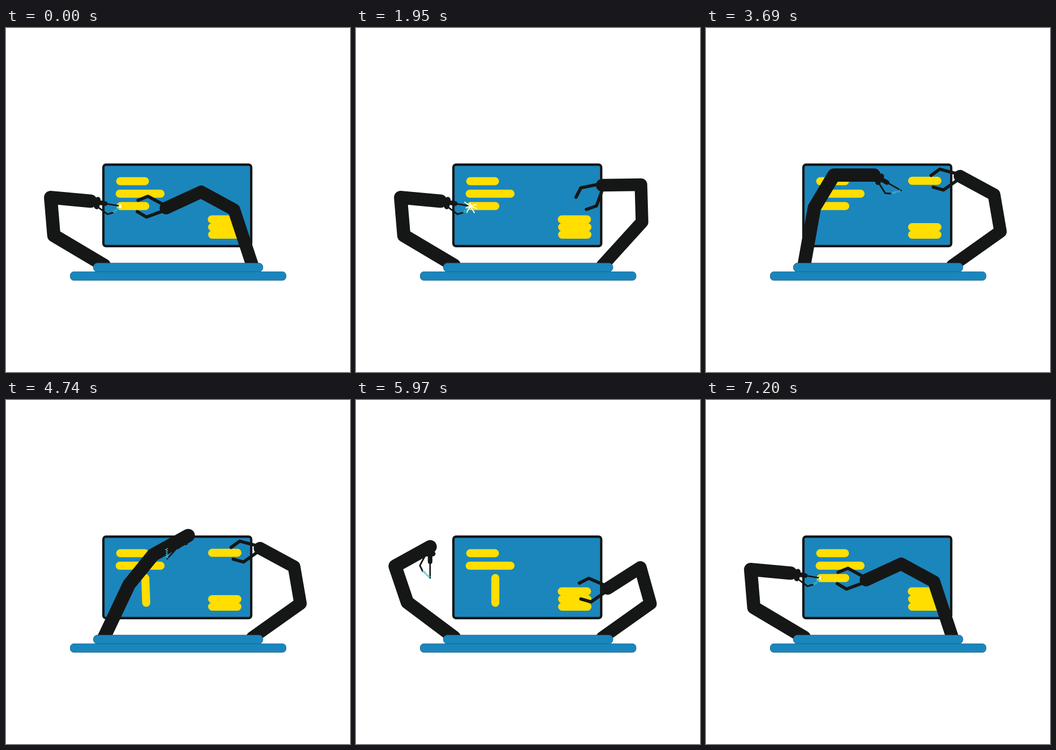
An HTML page with a canvas that plays this animation: 640 by 640 pixels, repeating every 7230 ms.

```html
<!DOCTYPE html>
<html lang="en">
<head>
<meta charset="utf-8">
<title>Robot arms at work</title>
<style>
html, body { margin: 0; width: 100%; height: 100%; overflow: hidden; background: #fff; }
canvas { display: block; width: 640px; height: 640px; }
</style>
</head>
<body>
<canvas id="stage" width="640" height="640"></canvas>
<script>
const LOOP = 7230;
const BLUE = '#1b86bc', DARK = '#151716', YELLOW = '#ffde00', EDGE = '#12618c', CYAN = '#3fb9ba';
const ctx = document.getElementById('stage').getContext('2d');
ctx.lineCap = ctx.lineJoin = 'round';

// A pose lists joint angles in degrees, each relative to the part before it.
// Left: three parts and the welder.
const weld = [-149.3, 54.5, 100.1, 4];
const press = [-118.3, 38.8, 72.5, 101.8];
const reach = [-64.7, 13.9, 55, -15];
const fold = [-64.7, 13.9, 21.8, 161];
const retract = [-86, 22, 33, 145];
const rest = [-143.2, 34.5, 79.7, 119];

// Right: three parts, the claw and its opening.
const hold = [-108.3, -43.2, -53.2, 28.9, 29];
const release = [-101.3, -43.2, -53.2, 9.2, 33.7];
const swing = [-47.8, -43.9, -89.1, -39.9, 33.7];
const stack = [-35.4, -70.2, -107, 27.1, 33.5];
const place = [-35.4, -64.4, -51.8, -38.6, 29.5];

const left = {
  base: [182.5, 441.5], lengths: [108.7, 71, 74.5], width: 24.8,
  steps: [[2300, weld], [3030, press], [4170, reach], [4440, reach], [4740, fold],
          [5200, retract], [5930, rest], [6000, rest], [7100, weld]]
};
const right = {
  base: [458.5, 442], lengths: [109.5, 69.5, 72], width: 23.5,
  steps: [[1050, hold], [1290, release], [1950, swing], [2270, stack], [2340, stack],
          [3000, place], [5250, place], [5900, stack], [6000, stack], [6800, hold]]
};

const rad = deg => deg * Math.PI / 180;

function ease(t, from, to) {
  const x = Math.min(1, Math.max(0, (t - from) / (to - from)));
  return x * x * (3 - 2 * x);
}

// Monotone cubic through the steps: a joint rests where it turns back, else flows on.
function joint(steps, j, t) {
  const n = steps.length - 1;
  if (t <= steps[0][0]) return steps[0][1][j];
  if (t >= steps[n][0]) return steps[n][1][j];
  let i = 0;
  while (t >= steps[i + 1][0]) i++;
  const slope = k => (steps[k + 1][1][j] - steps[k][1][j]) / (steps[k + 1][0] - steps[k][0]);
  const tangent = k => {
    if (k === 0 || k === n) return 0;
    const a = slope(k - 1), b = slope(k);
    return a * b <= 0 ? 0 : 2 * a * b / (a + b);
  };
  const [t0, p0] = steps[i], [t1, p1] = steps[i + 1];
  const d = t1 - t0, x = (t - t0) / d, y = 1 - x;
  return p0[j] * (1 + 2 * x) * y * y + tangent(i) * d * x * y * y
       + p1[j] * x * x * (3 - 2 * x) - tangent(i + 1) * d * x * x * y;
}

function random(seed) {
  const s = Math.sin(seed * 127.1 + 11.7) * 43758.5453;
  return s - Math.floor(s);
}

function line(points, width, color) {
  ctx.beginPath();
  points.forEach(([x, y]) => ctx.lineTo(x, y));
  ctx.lineWidth = width;
  ctx.strokeStyle = color;
  ctx.stroke();
}

function box(x, y, w, h, r, stroke, width) {
  ctx.beginPath();
  ctx.roundRect(x, y, w, h, r);
  ctx.fillStyle = BLUE;
  ctx.fill();
  ctx.lineWidth = width;
  ctx.strokeStyle = stroke;
  ctx.stroke();
}

function inFrame([x, y], angle, draw) {
  ctx.save();
  ctx.translate(x, y);
  ctx.rotate(rad(angle));
  draw();
  ctx.restore();
}

function drawBar(cx, cy, length) {
  const half = (length - 15) / 2;
  line([[cx - half, cy], [cx + half, cy]], 15, YELLOW);
}

// Draws the three arm parts, then the tool in the frame of the wrist.
function drawArm({ base, lengths, width, steps }, t, tool) {
  let [x, y] = base, angle = 0;
  const points = [base];
  lengths.forEach((len, j) => {
    angle += joint(steps, j, t);
    x += len * Math.cos(rad(angle));
    y += len * Math.sin(rad(angle));
    points.push([x, y]);
  });
  line(points, width, DARK);
  inFrame([x, y], angle + joint(steps, 3, t), () => tool(t));
}

function drawClaw(t) {
  const opening = joint(right.steps, 4, t);
  for (const side of [1, -1]) {
    inFrame([0, 0], side * opening, () =>
      line([[8, side * 2.5], [40, 0], [51.3, -side * 16.3]], 6, DARK));
  }
}

function drawWelder(t) {
  line([[13, -5], [13, 8]], 10, DARK);
  line([[18, 0], [28, 0]], 8.5, DARK);
  line([[28, 0], [58, 0]], 2.8, DARK);
  line([[18, 10], [35, 19], [45, 14]], 3, DARK);
  const step = Math.floor(t / 60), zigzag = [];
  for (let i = 0; i <= 8; i++) {
    const k = i / 8, side = (i % 2 ? 1 : -1) * (0.7 + random(step + i * 9));
    zigzag.push([45 + 12 * k + side, 14 - 13 * k + side]);
  }
  line(zigzag, 1.4, CYAN);
}

// Short bursts of rays fly out of the weld.
function drawSparks(t) {
  const age = (t - 7170 + LOOP) % LOOP;
  if (age > 2350) return;
  const period = 300, burst = Math.floor(age / period), p = age % period / period;
  line([[212, 332], [213, 331]], 5, '#fff');
  for (let i = 0; i < 7; i++) {
    const a = (i + 0.8 * random(burst * 7 + i)) * 2 * Math.PI / 7;
    const far = (9 + 14 * random(burst * 13 + i + 40)) * p, near = far * 0.3 * p;
    line([near, far].map(r => [212.5 + r * Math.cos(a), 331.5 + r * Math.sin(a)]), 1.9, '#fff');
  }
}

function drawBars(t) {
  drawBar(235.5, 285, 61);
  drawBar(249.5, 308.3, 91);
  const turn = 92 * ease(t, 3800, 4160) - 2 * ease(t, 4800, 5150) - 90 * ease(t, 6380, 6780);
  inFrame([259.2, 331.3], -turn, () => drawBar(-23, 0, 61));
  drawBar(407, 384.5, 62);
  drawBar(407, 370.5, 62);
  const lift = ease(t, 2340, 3000) - ease(t, 5250, 5900);
  drawBar(406.3 + 0.7 * lift - 9 * Math.sin(Math.PI * lift), 356 - 71.7 * lift, 62);
}

function draw(t) {
  ctx.fillStyle = '#fff';
  ctx.fillRect(0, 0, 640, 640);
  box(181.2, 254.2, 275, 151.6, 5, DARK, 4.4);
  drawBars(t);
  drawArm(left, t, drawWelder);
  drawSparks(t);
  drawArm(right, t, drawClaw);
  box(119.5, 453.5, 401.5, 16, 6.5, EDGE, 0.8);
  box(162.5, 437.3, 315.5, 16.2, 7.5, EDGE, 0.8);
}

const start = performance.now();
function tick() {
  draw((performance.now() - start) % LOOP);
  requestAnimationFrame(tick);
}
tick();
</script>
</body>
</html>
```
